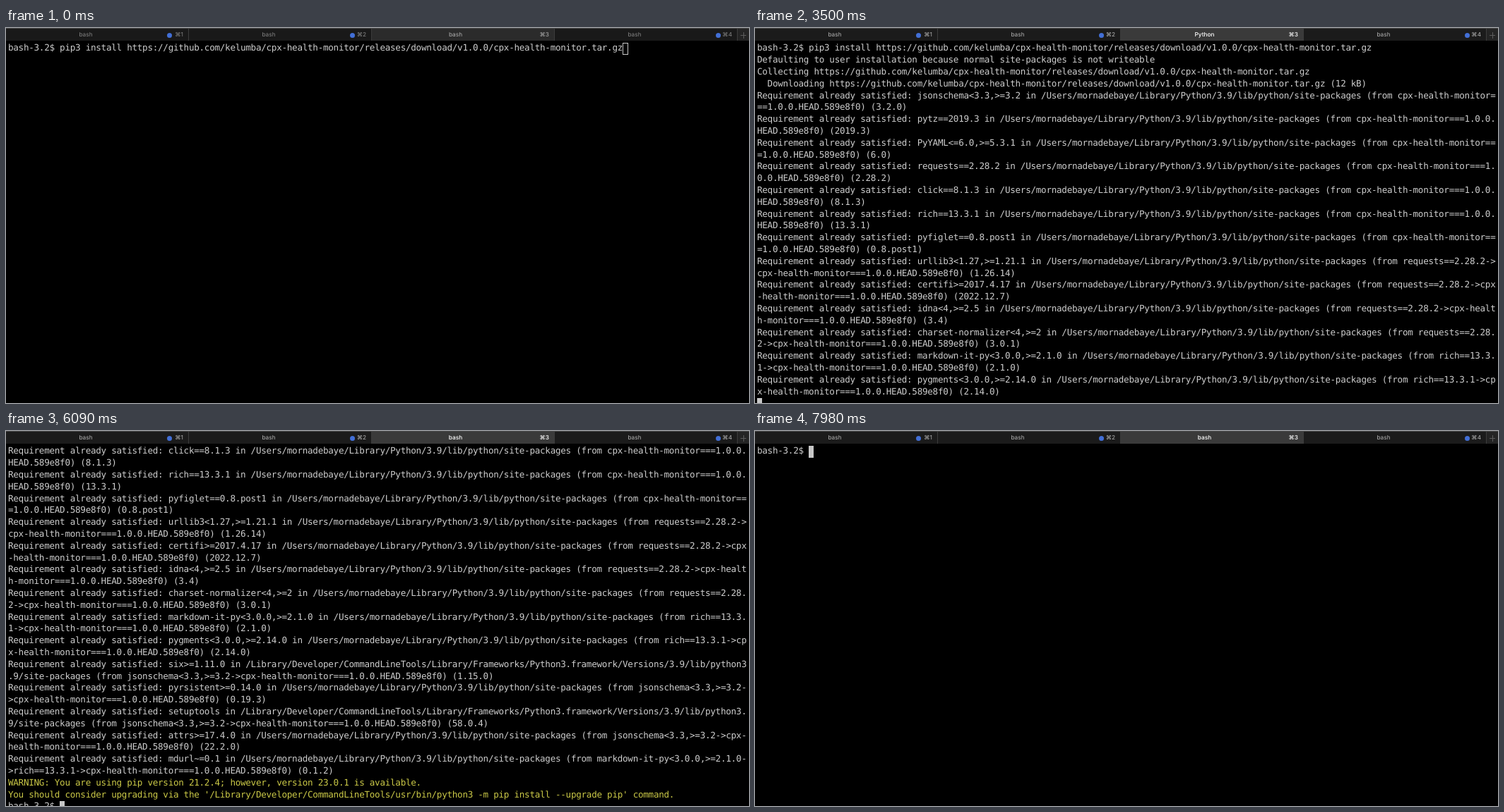
An HTML page for the animation above (8 s loop, 1052 px wide and 532 px high).

```html
<!DOCTYPE html>
<html lang="en">
<head>
<meta charset="utf-8">
<title>Terminal</title>
<style>
html, body { margin: 0; width: 100%; height: 100%; overflow: hidden; background: #000; }
#stage { position: relative; width: 1052px; height: 532px; overflow: hidden; background: #000; text-rendering: geometricPrecision; }
#stage * { position: absolute; }
#bar { left: 0; top: 0; width: 1052px; height: 18px; background: #191919; color: #858585; font: 8.3px/18px Inter, sans-serif; }
#bar::before { content: ""; position: absolute; z-index: 1; width: 1052px; height: 1px; background: #464646; }
.tab { top: 0; width: 258px; height: 18px; border-right: 1px solid #3c3c3c; }
.tab.active { background: #2b2b2b; color: #b0b0b0; }
.title { left: 63px; top: 1px; width: 100px; text-align: center; }
.active .title { left: 68.5px; }
.key { top: 1px; right: 7px; white-space: nowrap; }
.dot { left: 227.7px; top: 6.7px; width: 7px; height: 7px; border-radius: 50%; background: #426fd6; }
#plus { left: 1036px; top: 0; width: 16px; height: 18px; background: #242424; }
#plus i { background: #5c5c5c; }
.focused #bar { background: #1b1b1b; color: #b4b4b4; }
.focused .tab.active { background: #3a3a3a; color: #fff; font-weight: 500; }
#screen { left: 3px; top: 20.4px; margin: 0; color: #cdcdcd; font: 12.6px/16.81px "DejaVu Sans Mono", monospace; letter-spacing: -.271px; }
#screen div { position: static; height: 16.81px; white-space: pre; }
#screen .warn { color: #cbc947; }
#cursor { box-sizing: border-box; width: 8px; height: 17px; border: 1px solid #c7c7c7; }
.focused #cursor { width: 7.3px; background: #c7c7c7; }
</style>
</head>
<body>
<div id="stage">
  <div id="bar"><div id="plus"><i style="left:4px;top:10px;width:8px;height:1px"></i><i style="left:7.5px;top:6px;width:1px;height:9px"></i></div></div>
  <pre id="screen"></pre>
  <div id="cursor"></div>
</div>
<script>
const LOOP = 8000, COLS = 143, ROWS = 30, CELL_W = 7.315, CELL_H = 16.81;
const $ = id => document.getElementById(id);

const app = 'cpx-health-monitor';
const url = `https://github.com/kelumba/${app}/releases/download/v1.0.0/${app}.tar.gz`;
const prompt = 'bash-3.2$ ';
const userLib = '/Users/mornadebaye/Library/Python/3.9/lib/python/site-packages';
const systemLib = '/Library/Developer/CommandLineTools/Library/Frameworks/Python3.framework/Versions/3.9/lib/python3.9/site-packages';
const viaRequests = 'requests==2.28.2->';
const viaRich = 'rich==13.3.1->';
const viaSchema = 'jsonschema<3.3,>=3.2->';

const satisfied = ([spec, version, via = '', lib = userLib]) =>
  `Requirement already satisfied: ${spec} in ${lib} (from ${via}${app}===1.0.0.HEAD.589e8f0) (${version})\n`;

const firstBatch = [
  ['jsonschema<3.3,>=3.2', '3.2.0'],
  ['pytz==2019.3', '2019.3'],
  ['PyYAML<=6.0,>=5.3.1', '6.0'],
  ['requests==2.28.2', '2.28.2'],
  ['click==8.1.3', '8.1.3'],
  ['rich==13.3.1', '13.3.1'],
  ['pyfiglet==0.8.post1', '0.8.post1'],
  ['urllib3<1.27,>=1.21.1', '1.26.14', viaRequests],
  ['certifi>=2017.4.17', '2022.12.7', viaRequests],
  ['idna<4,>=2.5', '3.4', viaRequests],
  ['charset-normalizer<4,>=2', '3.0.1', viaRequests],
  ['markdown-it-py<3.0.0,>=2.1.0', '2.1.0', viaRich],
  ['pygments<3.0.0,>=2.14.0', '2.14.0', viaRich]
].map(satisfied).join('');

const secondBatch = [
  ['six>=1.11.0', '1.15.0', viaSchema, systemLib],
  ['pyrsistent>=0.14.0', '0.19.3', viaSchema],
  ['setuptools', '58.0.4', viaSchema, systemLib],
  ['attrs>=17.4.0', '22.2.0', viaSchema],
  ['mdurl~=0.1', '0.1.2', 'markdown-it-py<3.0.0,>=2.1.0->' + viaRich]
].map(satisfied).join('');

const warning = 'WARNING: You are using pip version 21.2.4; however, version 23.0.1 is available.\n' +
  `You should consider upgrading via the '/Library/Developer/CommandLineTools/usr/bin/python3 -m pip install --upgrade pip' command.\n`;

// Terminal output by time; a form feed clears the screen.
const output = [
  [0, `${prompt}pip3 install ${url}`],
  [1680, '\n'],
  [1960, `Defaulting to user installation because normal site-packages is not writeable\nCollecting ${url}\n`],
  [2730, `  Downloading ${url} (12 kB)\n`],
  [3500, firstBatch],
  [3570, secondBatch + warning],
  [3710, prompt],
  ...[...'clear'].map((letter, i) => [6580 + i * 87.5, letter]),
  [7560, '\f' + prompt]
];

const tabs = [0, 1, 2, 3].map(i => {
  const tab = document.createElement('div');
  tab.className = i === 2 ? 'tab active' : 'tab';
  tab.style.left = i * 259 + 'px';
  tab.innerHTML = '<span class="title">bash</span>' +
    (i === 2 ? '' : '<span class="dot"></span>') + `<span class="key">⌘${i + 1}</span>`;
  $('bar').append(tab);
  return tab;
});
const activeTitle = tabs[2].firstChild;

const wrap = line => line.match(new RegExp(`.{1,${COLS}}`, 'g')) || [''];

function drawText(text) {
  const rows = text.split('\n').flatMap(wrap).slice(-ROWS - 1);
  $('screen').replaceChildren(...rows.map(row => {
    const div = document.createElement('div');
    div.textContent = row;
    if (/^(WARNING|You should)/.test(row)) div.className = 'warn';
    return div;
  }));
  $('cursor').style.left = 3 + rows.at(-1).length * CELL_W + 'px';
  $('cursor').style.top = 20.5 + (rows.length - 1) * CELL_H + 'px';
}

let shown;
function frame(now) {
  const t = now % LOOP;
  const text = output.filter(([at]) => at <= t).map(([, part]) => part).join('').split('\f').pop();
  if (text !== shown) drawText(shown = text);
  $('stage').className = t >= 770 ? 'focused' : '';
  activeTitle.textContent = t >= 2450 && t < 4830 ? 'Python' : 'bash';
  requestAnimationFrame(frame);
}
frame(0);
</script>
</body>
</html>
```
